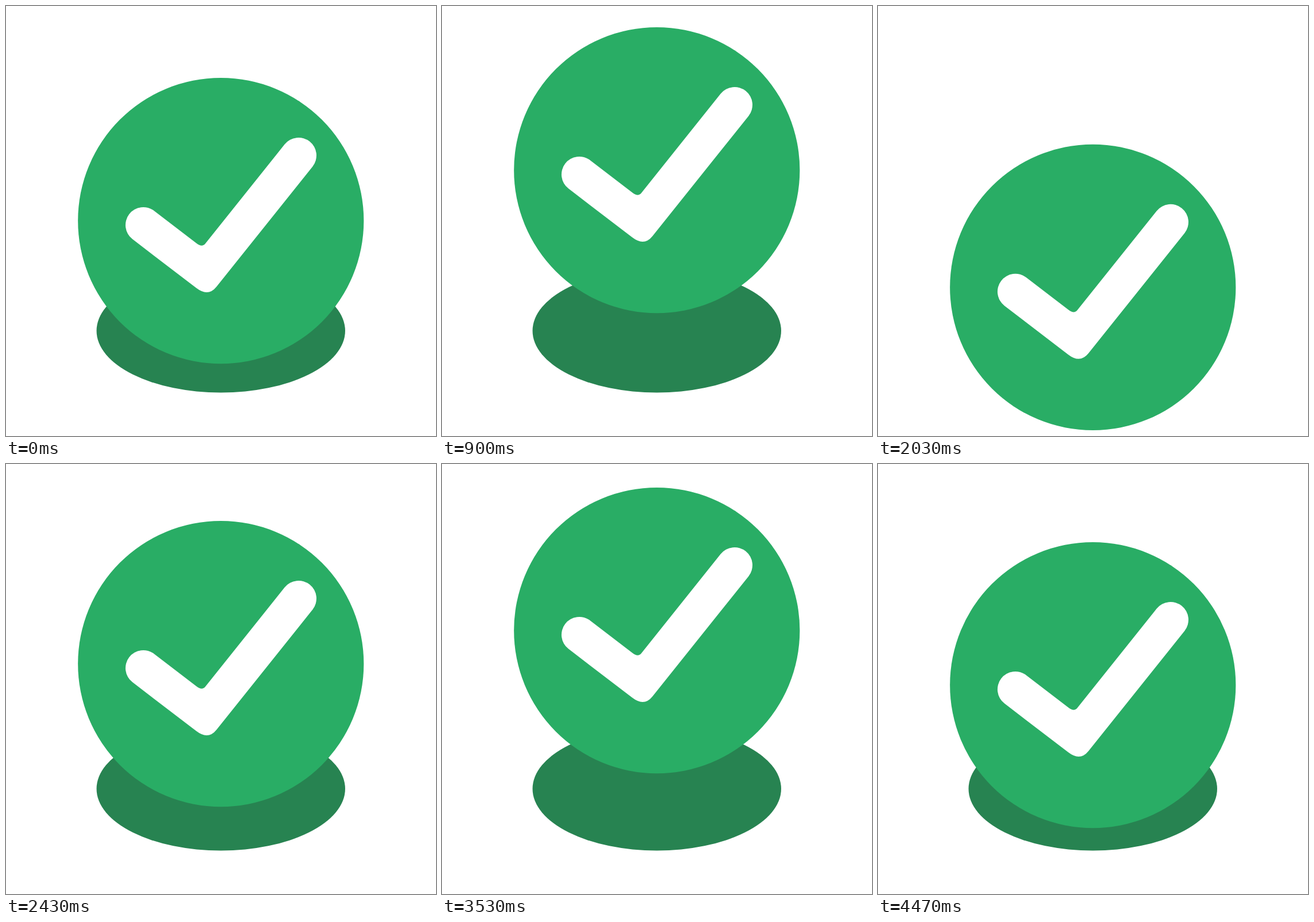
Recreate the animation shown at these times as an HTML page. Size 748 by 748 pixels, loop 5010 ms.

```html
<!DOCTYPE html>
<html lang="en">
<head>
<meta charset="utf-8">
<title>Floating check badge</title>
<style>
  html, body { margin: 0; width: 100%; height: 100%; overflow: hidden; background: #fff; }
  svg { display: block; width: 100%; height: 100%; }
</style>
</head>
<body>
<svg viewBox="0 0 748 748">
  <ellipse cx="373.75" cy="565" rx="216.25" ry="107.5" fill="#278351"/>
  <g id="badge">
    <circle cx="373.75" cy="248.6" r="248.6" fill="#29ad65"/>
    <path fill="#fff" d="M220 280.6A31 31 0 0 1 257.9 231.4L332 288.2Q341.2 295.2 347 287.9
      L484.8 115.6A31 31 0 0 1 533.2 154.4L366 363.4Q351.6 381.4 331 365.6Z"/>
  </g>
</svg>
<script>
const LOOP = 5010, FPS = 30;
const badge = document.getElementById('badge');

// [tick, top of the badge]: up, down, up, then settling; the last pose holds.
const keys = [
  [0, 125], [3, 83], [6, 51], [9, 29], [12, 17], [16, 9], [22, 7],
  [25, 18], [27, 37], [32, 108], [43, 215], [48, 227], [55, 236], [62, 241],
  [64, 238], [68, 175], [73, 99], [80, 44], [86, 21], [93, 8], [96, 5], [100, 1],
  [103, 13], [106, 41], [109, 68], [112, 87], [115, 100], [121, 115], [128, 128.5], [134, 136]
];

const secant = i => (keys[i + 1][1] - keys[i][1]) / (keys[i + 1][0] - keys[i][0]);

// Monotone slopes: flat at turning points, harmonic mean elsewhere.
const slopes = keys.map((_, i) => {
  if (i === 0) return secant(0);
  if (i === keys.length - 1) return secant(i - 1);
  const a = secant(i - 1), b = secant(i);
  return a * b > 0 ? 2 * a * b / (a + b) : 0;
});

function topAt(tick) {
  const next = keys.findIndex(key => key[0] > tick);
  if (next < 0) return keys[keys.length - 1][1];
  const i = next - 1;
  const [t0, y0] = keys[i], [t1, y1] = keys[next];
  const h = t1 - t0, u = (tick - t0) / h, v = 1 - u;
  return v * v * ((1 + 2 * u) * y0 + u * h * slopes[i])
       + u * u * ((1 + 2 * v) * y1 - v * h * slopes[next]);
}

function draw() {
  const ms = performance.now() % LOOP;
  const tick = Math.floor((ms + 4) * FPS / 1000);
  badge.setAttribute('transform', `translate(0 ${topAt(tick).toFixed(2)})`);
  requestAnimationFrame(draw);
}
draw();
</script>
</body>
</html>
```
